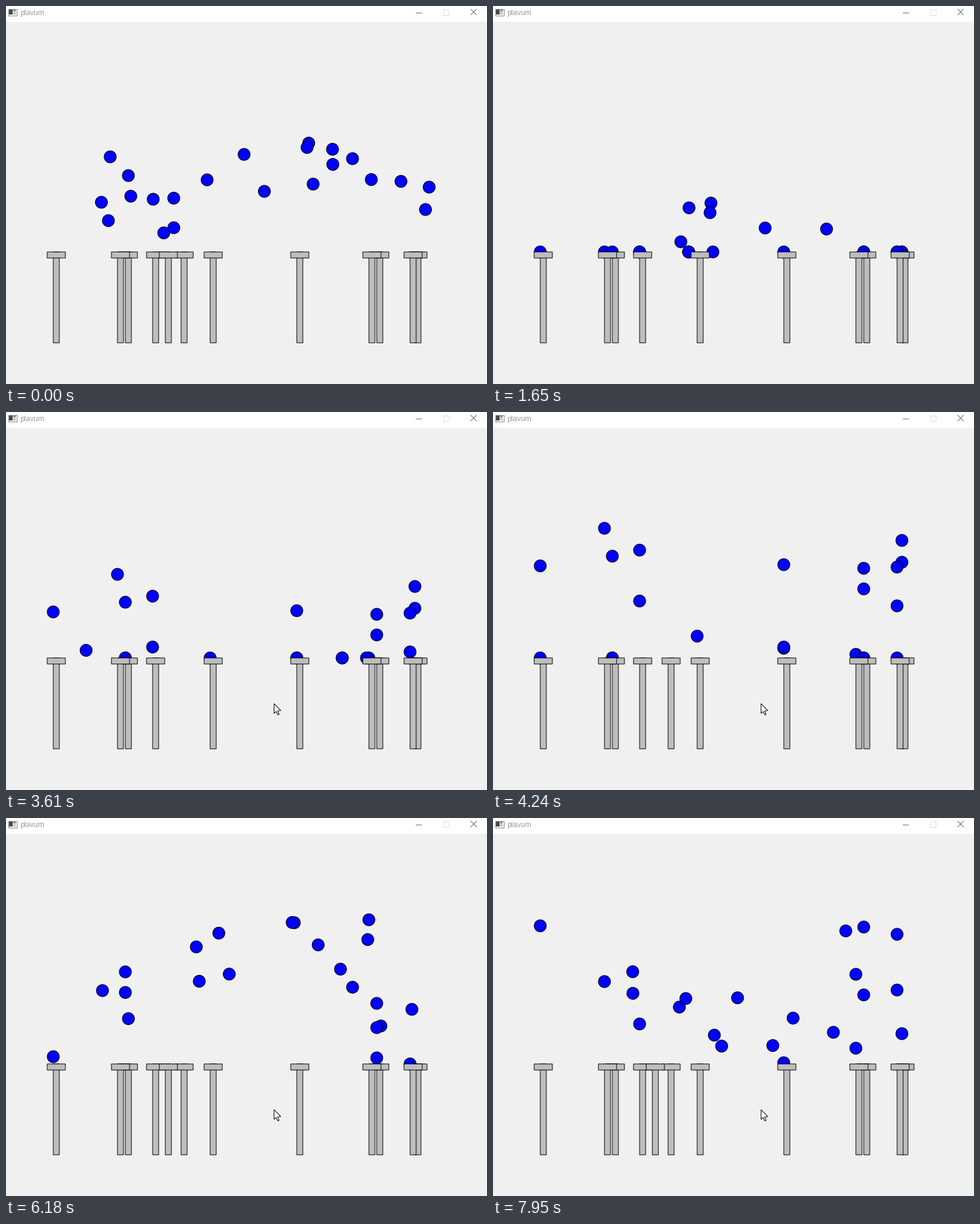
Write a matplotlib script that moves like this. It is 794 by 624 pixels and loops after 8000 ms.

```python
import math

import matplotlib.pyplot as plt
from matplotlib.animation import FuncAnimation
from matplotlib.patches import Circle, Polygon, Rectangle

W, H = 794, 624
DPI = 100
PX = 72 / DPI
INTERVAL, FRAMES = 40, 200

STEP_MS = 69.2          # the picture advances on this beat
TICKS_PER_STEP = 4.158  # simulation ticks per beat
LAST_STEP = 115

SPEED = 2
GROUND, CEILING = 406, 166
WAIT = 119
OUTAGE = 185
OUT = {289: 63, 263: 70}  # pillar -> tick at which it drops out

# back to front
PILLARS = [675, 667, 612, 599, 480, 337, 289, 242, 263, 197, 184, 78]

# start x, start y, pillar flown to, replacement if that one drops out
BALLS = [
    (507, 294, 612),
    (539.5, 261.5, 289, 78),
    (277, 366, 289, 242),
    (572, 252, 667),
    (260.5, 374.5, 263, 480),
    (202, 280, 263, 612),
    (157.5, 324, 78),
    (206, 314, 289, 667),
    (497, 233.5, 197),
    (276.9, 317.2, 263, 612),
    (539, 236.5, 197),
    (499.7, 226.3, 289, 480),
    (652, 289.5, 667),
    (243, 319, 197),
    (172, 249, 289, 337),
    (393, 245, 599),
    (692.5, 336, 675),
    (332, 287, 289, 242),
    (603, 286.5, 612),
    (169, 354.3, 184),
    (698.5, 299, 675),
    (426.5, 306, 480),
]


def tick_of(step):
    return round(step * TICKS_PER_STEP)


def onward(i):
    """Second stops are spread evenly over the pillars, left to right."""
    return sorted(PILLARS)[i * len(PILLARS) // len(BALLS)]


def track(x, y, *stops):
    """Positions of one ball, tick by tick: fly to a pillar, wait, rise, repeat."""
    stops = list(stops)
    goal, mode, waited = stops.pop(0), "fly", 0
    path = []
    for tick in range(tick_of(LAST_STEP) + 1):
        path.append((x, y))
        if OUT.get(goal) == tick:
            goal, mode = stops.pop(0), "fly"
        if mode == "fly":
            dx, dy = goal - x, GROUND - y
            dist = math.hypot(dx, dy)
            if dist <= SPEED:
                x, y, mode = goal, GROUND, "wait"
            else:
                x += dx / dist * SPEED
                y += dy / dist * SPEED
        elif mode == "wait":
            if waited < WAIT:
                waited += 1
            else:
                mode = "rise"
        else:
            y -= SPEED
            if y <= CEILING:
                mode = "fly"
                goal = stops.pop(0) if stops else goal
    return path


paths = [track(*ball, onward(i)) for i, ball in enumerate(BALLS)]

fig = plt.figure(figsize=(W / DPI, H / DPI), dpi=DPI, facecolor="#f0f0f0")
ax = fig.add_axes([0, 0, 1, 1])
ax.set_xlim(0, W)
ax.set_ylim(H, 0)
ax.axis("off")


def rect(x, y, w, h, face, edge="none", z=1, **kw):
    patch = Rectangle((x, y), w, h, facecolor=face, edgecolor=edge,
                      linewidth=PX, zorder=z, **kw)
    return ax.add_patch(patch)


def line(x0, y0, x1, y1, color):
    ax.plot([x0, x1], [y0, y1], color=color, lw=PX, zorder=2,
            solid_capstyle="butt")


def draw_title_bar():
    rect(0, 0, W, 26, "white")
    rect(3.5, 4.5, 14, 11, "#f4f4f4", "#8c8c8c")
    rect(5, 6, 6, 8, "#4a4a4a")
    rect(12, 6, 4, 3, "#8a8a8a")
    rect(12, 10, 4, 4, "#c4c4c4")
    ax.text(23.5, 15, "plavum", family="Liberation Sans", size=12.4 * PX,
            color="#999999", va="baseline", zorder=2)
    line(676, 10.5, 686, 10.5, "#666666")
    rect(721.5, 5.5, 9, 9, "none", "#dddddd")
    line(767, 5, 777, 15, "#666666")
    line(767, 15, 777, 5, "#666666")


def make_pillar(x, z):
    style = dict(face="#bebebe", edge="black", joinstyle="bevel", snap=False)
    return [rect(x, GROUND, 10, 150, z=z, **style),
            rect(x - 10, GROUND, 30, 10, z=z + 0.5, **style)]


draw_title_bar()

circles = []
for i, path in enumerate(paths):
    c = Circle(path[0], 10, facecolor="#0000ff", edgecolor="black",
               linewidth=PX, zorder=4 - i * 0.01, snap=False)
    circles.append(ax.add_patch(c))

pillars = {x: make_pillar(x, 5 + i) for i, x in enumerate(PILLARS)}

ARROW = [(0, 0), (0, 16), (3.6, 12.9), (6.2, 18.6), (8.4, 17.7), (6, 12), (11, 11.3)]
cursor = ax.add_patch(Polygon(ARROW, closed=True, facecolor="white",
                              edgecolor="black", linewidth=PX, zorder=30))
ENTER, SETTLE = 30, 3  # beats


def place_cursor(step):
    cursor.set_visible(step >= ENTER)
    left = max(0, 1 - (step - ENTER) / SETTLE) ** 1.6
    x, y = 442.5 + 20 * left, 481.5 + 109 * left
    cursor.set_xy([(x + dx, y + dy) for dx, dy in ARROW])


def draw(i):
    step = min(LAST_STEP, int((i * INTERVAL + 45) / STEP_MS))
    tick = tick_of(step)
    for c, path in zip(circles, paths):
        c.set_center(path[tick])
    for x, start in OUT.items():
        shown = not start <= tick < start + OUTAGE
        for part in pillars[x]:
            part.set_visible(shown)
    place_cursor(step)
    return circles


anim = FuncAnimation(fig, draw, frames=FRAMES, interval=INTERVAL,
                     repeat=True, repeat_delay=0, blit=False)
plt.show()
```
